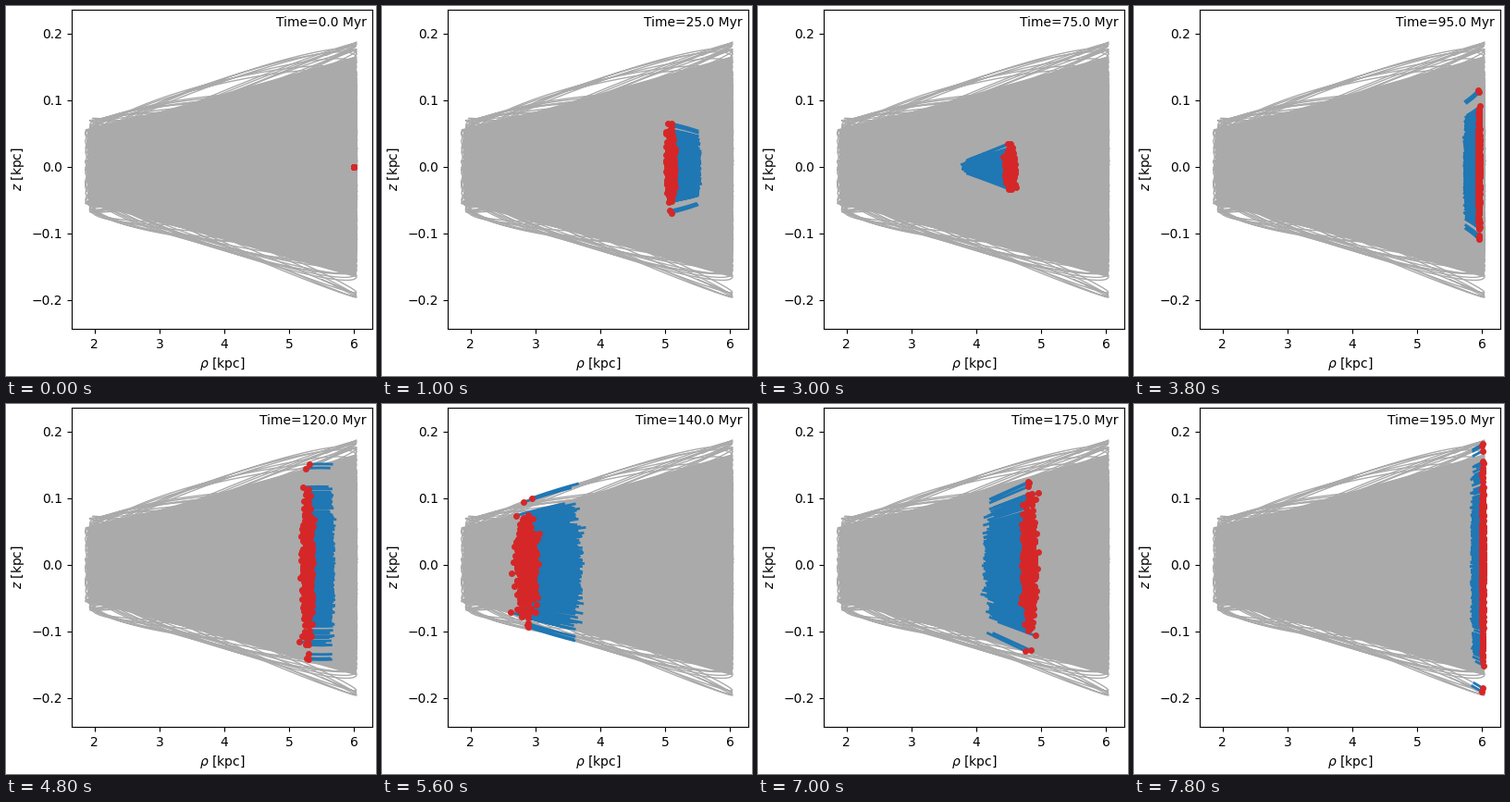
These frames come from a looping animation (400x400 px, 8 s). A matplotlib script:

```python
import numpy as np
import matplotlib.pyplot as plt
from matplotlib.animation import FuncAnimation

# Stars launched from one point in a slightly flattened isochrone potential (kpc, Myr)
GM, B, FLAT = 0.593, 3.1, 0.978
V_R, V_T, SIGMA = 0.0178, 0.0801, 0.00102
N_STARS, DT, SPAN = 500, 0.5, 700
FRAMES, MYR_PER_FRAME = 40, 5
STEPS = int(MYR_PER_FRAME / DT)
GREY, BLUE, RED = "#aaaaaa", "#1f77b4", "#d62728"


def start_velocities():
    rng = np.random.default_rng(11)
    vel = np.clip(rng.normal(size=(N_STARS, 3)), -2.7, 2.7) * SIGMA
    vel += [V_R, V_T, 0]
    tilt = vel[:, 2] / V_T
    vel[np.abs(tilt) > 0.0308, 2] *= 0.5
    # a few stars on clearly steeper orbits
    steep = np.array([-0.0377, -0.0369, 0.0360, 0.0352, 0.0340])
    vel[:len(steep), 2] = steep * vel[:len(steep), 1]
    return vel


def accel(pos):
    squash = np.array([1, 1, 1 / FLAT ** 2])
    r2 = (pos ** 2 * squash).sum(axis=1, keepdims=True)
    a = np.sqrt(B * B + r2)
    return -GM * pos * squash / (a * (B + a) ** 2)


def integrate(vel):
    """Leapfrog; returns rho and z with shape (time, star)."""
    pos = np.zeros_like(vel)
    pos[:, 0] = 6
    path = [pos]
    for _ in range(int(SPAN / DT)):
        vel = vel + accel(pos) * DT / 2
        pos = pos + vel * DT
        vel = vel + accel(pos) * DT / 2
        path.append(pos)
    path = np.array(path)
    return np.hypot(path[..., 0], path[..., 1]), path[..., 2]


vel0 = start_velocities()
rho, z = integrate(vel0)

fig = plt.figure(figsize=(4, 4), dpi=100)
ax = fig.add_axes([71 / 400, 51 / 400, 325 / 400, 345 / 400])
ax.set_xlim(1.648, 6.278)
ax.set_ylim(-0.243, 0.2354)
ax.set_yticks([-0.2, -0.1, 0, 0.1, 0.2])
ax.set_xlabel(r"$\rho$ [kpc]")
ax.set_ylabel("$z$ [kpc]")

# Full orbits: a solid core plus the lines that shape its outline
lo, hi, slope = 1.93, 6.03, 0.0275
ax.fill([lo, hi, hi, lo], np.array([lo, hi, -hi, -lo]) * slope, color=GREY, lw=0, zorder=1)
order = np.argsort(-np.abs(vel0[:, 2]))
for i in np.concatenate([order[:45], order[45::10]]):
    ax.plot(rho[::2, i], z[::2, i], color=GREY, lw=1, zorder=1)

trail, = ax.plot([], [], color=BLUE, lw=2, zorder=2)
dots, = ax.plot([], [], "o", color=RED, ms=4, zorder=3)
clock = ax.text(0.98, 0.98, "", transform=ax.transAxes, ha="right", va="top", zorder=4)


def segments(values, k):
    part = values[k - STEPS:k + 1:2]
    gap = np.full((1, N_STARS), np.nan)
    return np.vstack([part, gap]).T.ravel()


def update(frame):
    k = frame * STEPS
    if frame:
        trail.set_data(segments(rho, k), segments(z, k))
    else:
        trail.set_data([], [])
    dots.set_data(rho[k], z[k])
    clock.set_text(f"Time={frame * MYR_PER_FRAME:.1f} Myr")
    return trail, dots, clock


anim = FuncAnimation(fig, update, frames=FRAMES, interval=200, repeat=True, repeat_delay=0)
plt.show()
```
